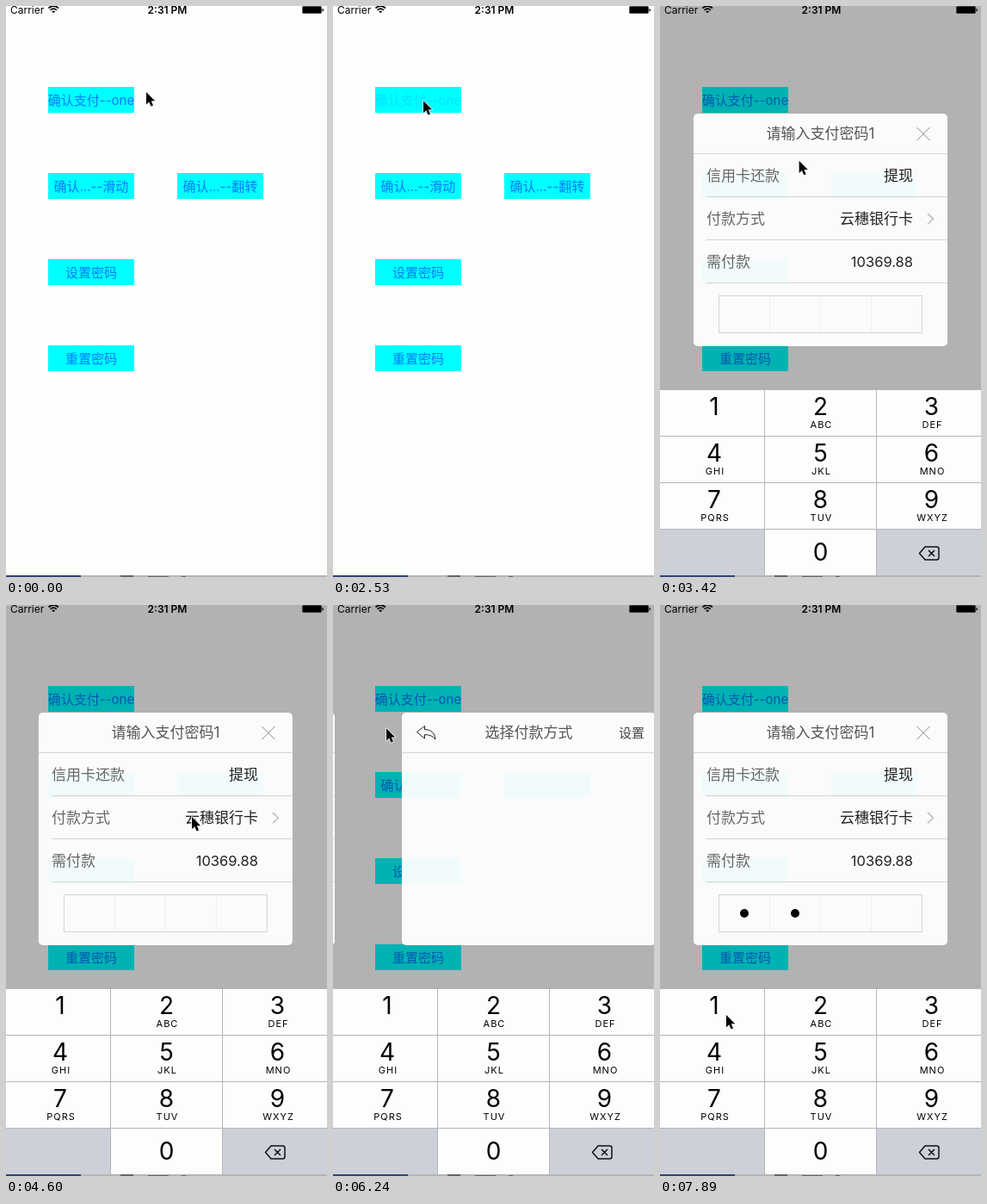
Animation, 373 px wide and 663 px high, one loop 8000 ms. Source, as an HTML page:

```html
<!DOCTYPE html>
<html lang="zh-CN">
<head>
<meta charset="utf-8">
<title>支付密码</title>
<style>
  html, body { margin: 0; width: 100%; height: 100%; overflow: hidden; background: #fefefe; }
  svg { display: block; width: 373px; height: 663px; }
  text { font-family: Inter, "Noto Sans CJK SC", "Noto Sans CJK", sans-serif; }
  .mid { text-anchor: middle; }
  .end { text-anchor: end; }
  .status { font-size: 12px; }
  .button rect { fill: #0ff; }
  .button text { font-size: 15px; fill: #007aff; text-anchor: middle; }
  .card text { font-size: 17px; fill: #666; }
  .card .title { fill: #555; }
  .card .value { fill: #222; }
  .card .amount { font-size: 16.5px; }
  .card .small { font-size: 15px; fill: #444; }
  .line { stroke: #d4d4d4; fill: none; }
  .key { font-size: 28px; text-anchor: middle; }
  .letters { font-size: 11px; letter-spacing: 1px; text-anchor: middle; }
</style>
</head>
<body>
<svg viewBox="0 0 373 663">
  <rect width="373" height="663" fill="#fefefe"/>

  <text class="status" x="5" y="8.5">Carrier</text>
  <g fill="none" stroke="#000" stroke-width="1.7">
    <path d="M49.5 2.5q5.7-5 11.4 0M51.6 4.8q3.6-3.2 7.2 0"/>
    <path d="M53.2 6.3q2-1.6 4 0l-2 2z" fill="#000" stroke="none"/>
  </g>
  <text class="status mid" x="187.5" y="8.5" font-weight="600">2:31 PM</text>
  <rect x="344.5" y="0.5" width="22" height="8" rx="1" stroke="#555"/>
  <path d="M367.5 3v3.5q1.5-.4 1.5-1.8t-1.5-1.7z"/>

  <g id="buttons"></g>
  <rect id="dim" width="373" height="663" opacity=".3"/>

  <g id="payCard" class="card">
    <rect width="295" height="270" rx="5" fill="#fff" fill-opacity=".95"/>
    <text class="title mid" x="147.5" y="29.4">请输入支付密码1</text>
    <path d="M259.5 16l15 15m0-15l-15 15" stroke="#888" fill="none"/>
    <path class="line" d="M0 46.5H295M15 96.5H295M15 146.5H295M15 196.5H295"/>
    <text x="15" y="78.4">信用卡还款</text>
    <text class="value end" x="255" y="78.4">提现</text>
    <text x="15" y="128.4">付款方式</text>
    <text class="value end" x="255" y="128.4">云穗银行卡</text>
    <path d="M272 116l6.5 6.2-6.5 6.2" fill="none" stroke="#c4c4c8" stroke-width="1.8"/>
    <text x="15" y="178.4">需付款</text>
    <text class="value amount end" x="255" y="178.2">10369.88</text>
    <path d="M88.5 212v42m59-42v42m59-42v42" stroke="#efefef"/>
    <rect class="line" x="29.5" y="211.5" width="236" height="43"/>
    <circle id="dot1" cx="59" cy="233" r="5"/>
    <circle id="dot2" cx="118" cy="233" r="5"/>
  </g>

  <g id="methodCard" class="card">
    <rect width="295" height="270" rx="5" fill="#fff" fill-opacity=".95"/>
    <path d="M17.5 22.5l9-7v4c7 0 12 4 12.500 11.500q-4-5.500-12.500-5.500v4.500z" fill="none" stroke="#222" stroke-linejoin="round"/>
    <text class="title mid" x="147.500" y="29.400">选择付款方式</text>
    <text class="small end" x="282" y="28.700">设置</text>
    <path class="line" d="M0 46.5H295"/>
  </g>

  <g id="keyboard">
    <rect width="373" height="218" fill="#fdfdfd"/>
    <rect id="pressed" width="121" height="54" fill="#cdd0d9"/>
    <path d="M0 162H121V218H0zM252 162H373V218H252z" fill="#cdd0d9"/>
    <path d="M0 .5H373M0 54.5H373M0 108.5H373M0 162.5H373M121.500 0V218M251.500 0V218" stroke="#b4b5b8"/>
    <g id="keys"></g>
    <path d="M301.500 190.500l6.500-7.500h13.500q2.500 0 2.500 2.500v10q0 2.500-2.500 2.500h-13.500zM312 187l7 7m0-7l-7 7" fill="none" stroke="#111" stroke-width="1.500" stroke-linejoin="round"/>
  </g>

  <path d="M0 661H373V663H0z" fill="#b5b5b5"/>
  <path d="M0 661H87V663H0z" fill="#2c4675"/>
  <path d="M133 661h15v2h-15zM165 662h24v1h-24zM204 662h5v1h-5z" fill="#666"/>

  <g id="cursor">
    <path d="M0 0V14.300L3.300 11.300L5.500 16.500L8 15.400L5.800 10.300H10.200Z" stroke="#fff" stroke-width="1.600" paint-order="stroke" stroke-linejoin="round"/>
  </g>
</svg>
<script>
const $ = id => document.getElementById(id);
const LOOP = 8000, PAGE = 373, CARD_X = 39;

const button = (x, y, label) =>
  `<g class="button"><rect x="${x}" y="${y}" width="100" height="30"/>` +
  `<text x="${x + 50}" y="${y + 20.5}">${label}</text></g>`;
$('buttons').innerHTML =
  button(49, 94, '确认支付--one') + button(49, 194, '确认…--滑动') +
  button(199, 194, '确认…--翻转') + button(49, 294, '设置密码') + button(49, 394, '重置密码');
const payLabel = document.querySelector('.button text');

const columns = [63, 186.5, 315.5];
const letters = ['', 'ABC', 'DEF', 'GHI', 'JKL', 'MNO', 'PQRS', 'TUV', 'WXYZ'];
$('keys').innerHTML = letters.map((word, i) => {
  const x = columns[i % 3], y = 54 * Math.floor(i / 3);
  return `<text class="key" x="${x}" y="${y + 30}">${i + 1}</text>` +
    `<text class="letters" x="${x + 1}" y="${y + 45}">${word}</text>`;
}).join('') + `<text class="key" x="${columns[1]}" y="199">0</text>`;

// time, x, y
const cursorPath = [
  [0, 163, 100], [1341, 163, 100], [1342, 150, 105], [1490, 136, 107], [1930, 110, 110],
  [2380, 105, 110], [2970, 105, 110], [3120, 112, 118], [3570, 190, 215], [3850, 214, 244],
  [4010, 214, 244], [4300, 216, 246], [5340, 216, 246], [5640, 140, 180], [5780, 106, 151],
  [5930, 101, 148], [6080, 90, 146], [6225, 62, 143], [6380, 62, 150], [6530, 63, 210],
  [6680, 66, 320], [6830, 70, 400], [7130, 76, 466], [7280, 77, 476], [LOOP, 77, 476]
];

const progress = (t, start, length) => Math.min(1, Math.max(0, (t - start) / length));
const easeInOut = p => (1 - Math.cos(Math.PI * p)) / 2;
const easeOut = p => 1 - (1 - p) ** 3;
const show = (id, on) => $(id).setAttribute('visibility', on ? 'visible' : 'hidden');
const place = (id, value) => $(id).setAttribute('transform', value);

// The screen refreshes in slow, slightly lengthening ticks.
const tick = k => 1342 + 147 * k + 0.033 * k * k;
function snap(t) {
  if (t < tick(0)) return 0;
  let k = 0;
  while (tick(k + 1) <= t) k++;
  return tick(k);
}

function cursorAt(t) {
  const i = Math.max(1, cursorPath.findIndex(p => p[0] >= t));
  const [a, b] = [cursorPath[i - 1], cursorPath[i]];
  const p = progress(t, a[0], b[0] - a[0]);
  return [1, 2].map(n => a[n] + (b[n] - a[n]) * p);
}

function draw(t) {
  const open = t > 2850;
  const appear = easeInOut(progress(t, 2854, 300));
  const slide = easeInOut(progress(t, 4565, 776)) - easeInOut(progress(t, 6062, 776));
  const payX = CARD_X - PAGE * slide;

  show('dim', open);
  show('payCard', open);
  show('methodCard', open);
  show('keyboard', open);
  show('pressed', open && t > 7560 && t < 7700);
  show('dot1', t > 7700);
  show('dot2', t > 7850);

  payLabel.setAttribute('opacity', t > 2500 ? 0.2 + 0.8 * progress(t, 3000, 200) : 1);
  $('payCard').setAttribute('opacity', appear);
  place('payCard', `translate(${payX + 147.5} 260) scale(${1.2 - 0.2 * appear}) translate(-147.5 -135)`);
  place('methodCard', `translate(${payX + PAGE} 125)`);
  place('keyboard', `translate(0 ${663 - 218 * easeOut(progress(t, 2891, 500))})`);
  place('cursor', `translate(${cursorAt(t)})`);
}

const begin = performance.now();
function loop() {
  draw(snap((performance.now() - begin) % LOOP));
  requestAnimationFrame(loop);
}
loop();
</script>
</body>
</html>
```
